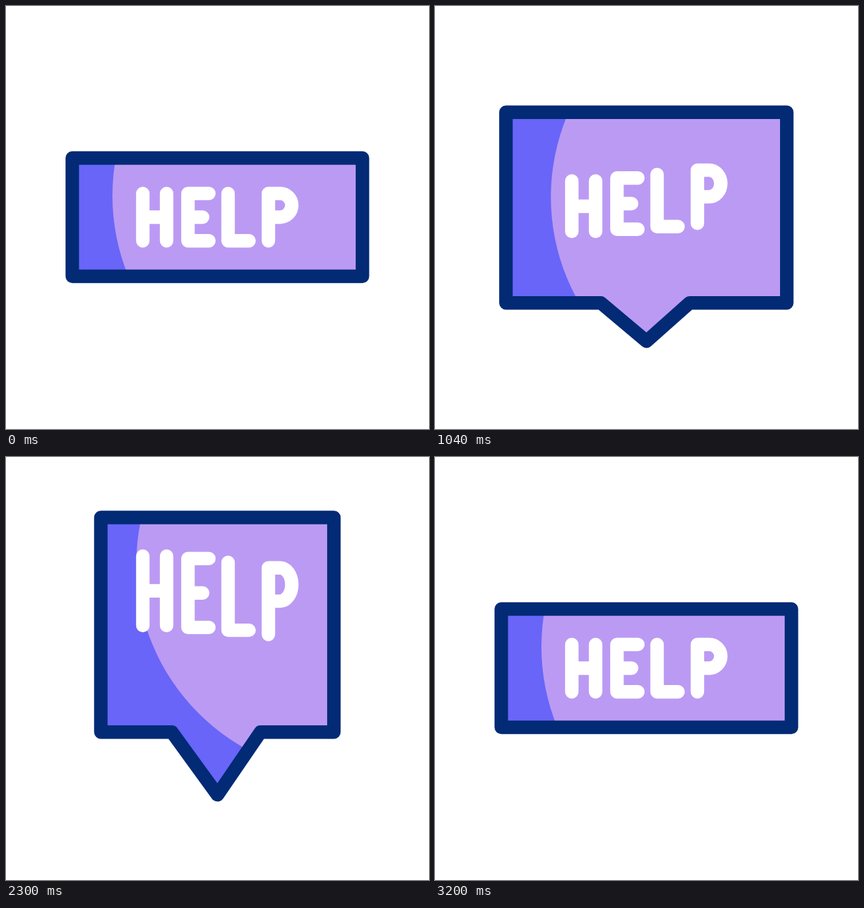
An HTML page with a canvas for the animation above (3600 ms loop, 640 by 640 pixels).

```html
<!DOCTYPE html>
<html lang="en">
<head>
<meta charset="utf-8">
<title>Help bubble</title>
<style>
  html, body { margin: 0; width: 100%; height: 100%; overflow: hidden; background: #fff; }
  canvas { display: block; }
</style>
</head>
<body>
<canvas id="stage" width="640" height="640" role="img" aria-label="HELP"></canvas>
<script>
const ctx = document.getElementById('stage').getContext('2d');
const LOOP = 3600, GROW = 200, TURN = 2000, SHRINK = 2060, LAG = 20;

// Each move has three legs: end time and the two horizontal easing handles.
const LEGS = [
  { from: 0, to: 292, x1: .5, x2: .3 },
  { from: 292, to: 602, x1: .575, x2: .28 },
  { from: 602, to: 1090, x1: .31, x2: 0 }
];

// Frame poses: half width, top, bottom, tail tip, left edge and centre y of the light disc.
const RECT = [219.5, 230, 409, 409, 161, 287];
const SQUASH = [271.8, 359.5, 513, 513, 182, 428];
const STRETCH = [168.4, 76.3, 409, 512, 202, 133];
const BUBBLE = [219.5, 174.3, 455.7, 506.5, 171, 314];

// Letters: left and right stroke centres at rest and when squashed.
const LETTERS = [
  { draw: drawH, rest: [207, 243], wide: [93, 152] },
  { draw: drawE, rest: [275.3, 307], wide: [227, 283] },
  { draw: drawL, rest: [336, 367.7], wide: [355, 420] },
  { draw: drawP, rest: [397, 432.4], wide: [487, 553] }
];
const REST_Y = [283.6, 355.3], WIDE_Y = [425.8, 489], TALL_Y = [146.5, 252.5];

function ease(u, { x1, x2 }) {
  let lo = 0, hi = 1;
  for (let i = 0; i < 24; i++) {
    const s = (lo + hi) / 2, r = 1 - s;
    if (3 * s * r * r * x1 + 3 * s * s * r * x2 + s ** 3 < u) lo = s; else hi = s;
  }
  return lo * lo * (3 - 2 * lo);
}

function poseAt(poses, time) {
  if (time <= 0) return poses[0];
  const i = LEGS.findIndex(leg => time < leg.to);
  if (i < 0) return poses[3];
  const leg = LEGS[i];
  const f = ease((time - leg.from) / (leg.to - leg.from), leg);
  return poses[i].map((v, k) => v + (poses[i + 1][k] - v) * f);
}

function line(...points) {
  points.forEach(([x, y], i) => i ? ctx.lineTo(x, y) : ctx.moveTo(x, y));
}

function drawH(l, r, top, bottom, mid) {
  line([l, top], [l, bottom]);
  line([r, top], [r, bottom]);
  line([l, mid], [r, mid]);
}

function drawE(l, r, top, bottom, mid) {
  line([r, top], [l, top], [l, bottom], [r, bottom]);
  line([l, mid], [l + (r - l) * .7, mid]);
}

function drawL(l, r, top, bottom) {
  line([l, top], [l, bottom], [r, bottom]);
}

function drawP(l, r, top, bottom, mid) {
  const x = (l + r) / 2;
  line([l, bottom], [l, top], [x, top]);
  ctx.ellipse(x, (top + mid) / 2, r - x, (mid - top) / 2, 0, -Math.PI / 2, Math.PI / 2);
  ctx.lineTo(l, mid);
}

function drawFrame([half, top, bottom, tip, discLeft, discY]) {
  const l = 319.8 - half, r = 319.8 + half;
  const shape = new Path2D(
    `M${l} ${top}H${r}V${bottom}H385L320 ${tip}L251 ${bottom}H${l}Z`);
  ctx.fillStyle = '#6865f8';
  ctx.fill(shape);
  ctx.save();
  ctx.clip(shape);
  ctx.fillStyle = '#bb9af3';
  ctx.beginPath();
  ctx.arc(discLeft + 320, discY, 320, 0, 2 * Math.PI);
  ctx.fill();
  ctx.restore();
  ctx.strokeStyle = '#022a75';
  ctx.stroke(shape);
}

function render(now) {
  const t = now % LOOP, growing = t < TURN;
  const time = t - (growing ? GROW : SHRINK);
  const order = poses => growing ? poses : poses.slice().reverse();

  ctx.fillStyle = '#fff';
  ctx.fillRect(0, 0, 640, 640);
  ctx.lineWidth = 20.4;
  ctx.lineCap = ctx.lineJoin = 'round';

  // The frame moves with the first letter when growing, with the last when shrinking.
  drawFrame(poseAt(order([RECT, SQUASH, STRETCH, BUBBLE]), time - (growing ? 0 : 3 * LAG)));

  ctx.strokeStyle = '#fff';
  LETTERS.forEach(({ draw, rest, wide }, i) => {
    const still = [...rest, ...REST_Y];
    const poses = order([still, [...wide, ...WIDE_Y], [...rest, ...TALL_Y], still]);
    const [l, r, top, bottom] = poseAt(poses, time - i * LAG);
    ctx.beginPath();
    draw(l, r, top, bottom, (top + bottom) / 2);
    ctx.stroke();
  });
}

function tick() {
  render(performance.now());
  requestAnimationFrame(tick);
}
tick();
</script>
</body>
</html>
```
